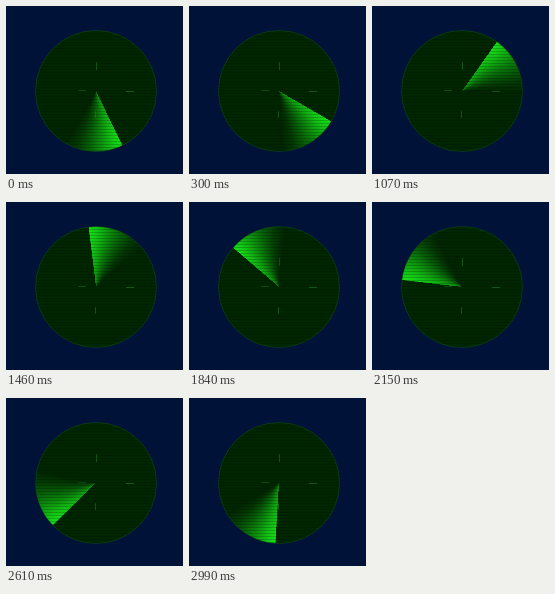
Write an HTML page with a canvas that moves like this. It is 177 px wide and 168 px high and loops after 3070 ms.

```html
<!DOCTYPE html>
<html lang="en">
<head>
<meta charset="utf-8">
<title>Radar sweep</title>
<style>
  html, body { margin: 0; width: 100%; height: 100%; overflow: hidden; background: #001238; }
  canvas { display: block; }
</style>
</head>
<body>
<canvas id="radar" width="177" height="168"></canvas>
<script>
const ctx = document.getElementById('radar').getContext('2d');
const CX = 90, CY = 85, R = 60.5;
const LOOP = 3070, STEPS = 40;
const START = 64, TURN = 8.48, TRAIL = 56;   // degrees
const rad = deg => deg * Math.PI / 180;

// Start time of every step: one short hold, then a repeating 13-beat rhythm.
const rhythm = '8878887878878';
const starts = [0];
for (let i = 1, t = 70; i < STEPS; i++) {
  starts.push(t);
  t += 10 * rhythm[(i - 1) % rhythm.length];
}

function stepAt(t) {
  let i = STEPS - 1;
  while (starts[i] > t) i--;
  return i;
}

function disc() {
  ctx.beginPath();
  ctx.arc(CX, CY, R, 0, 2 * Math.PI);
}

function drawDial() {
  ctx.fillStyle = '#002600';
  ctx.fillRect(CX - R, CY - R, 2 * R, 2 * R);
  ctx.fillStyle = '#145a14';
  ctx.fillRect(72, 84, 8, 1);
  ctx.fillRect(120, 85, 8, 1);
  ctx.fillRect(90, 56, 1, 8);
  ctx.fillRect(89, 105, 1, 7);
}

function drawSweep(angle) {
  const fan = ctx.createConicGradient(rad(angle), CX, CY);
  const stops = [[0, 1], [0.15, 0.86], [0.35, 0.6], [0.6, 0.3], [0.8, 0.11], [1, 0]];
  for (const [p, a] of stops) {
    fan.addColorStop(p * TRAIL / 360, `rgba(22, 222, 24, ${a})`);
  }
  fan.addColorStop(1, 'rgba(22, 222, 24, 0)');
  ctx.fillStyle = fan;
  ctx.beginPath();
  ctx.moveTo(CX, CY);
  ctx.arc(CX, CY, R, rad(angle), rad(angle + TRAIL));
  ctx.closePath();
  ctx.fill();

  // The beam is dimmer towards the hub.
  const hub = ctx.createRadialGradient(CX, CY, 0, CX, CY, R);
  hub.addColorStop(0, 'rgba(0, 30, 0, 0.4)');
  hub.addColorStop(0.85, 'rgba(0, 30, 0, 0)');
  ctx.fillStyle = hub;
  ctx.fill();
}

function drawScanlines() {
  ctx.fillStyle = 'rgba(0, 0, 0, 0.2)';
  for (let y = 24; y < 147; y += 3) ctx.fillRect(29, y, 123, 1);
}

function draw(t) {
  ctx.fillStyle = '#001238';
  ctx.fillRect(0, 0, 177, 168);
  ctx.save();
  disc();
  ctx.clip();
  drawDial();
  drawSweep(START - TURN * stepAt(t));
  drawScanlines();
  ctx.restore();
  ctx.strokeStyle = 'rgba(20, 90, 20, 0.45)';
  ctx.lineWidth = 1;
  disc();
  ctx.stroke();
}

const begin = performance.now();
function tick() {
  draw((performance.now() - begin) % LOOP);
  requestAnimationFrame(tick);
}
tick();
</script>
</body>
</html>
```
